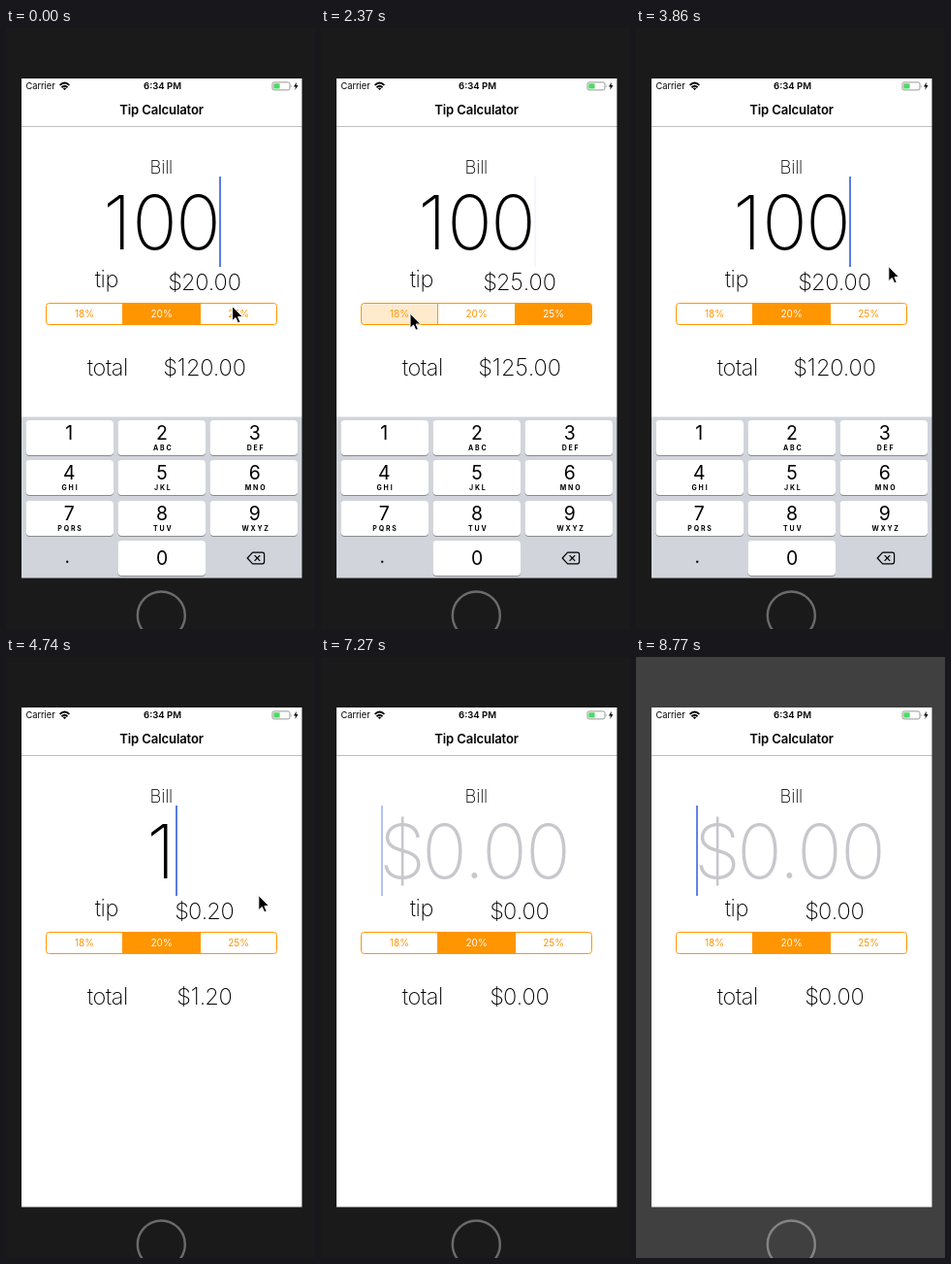
An HTML page for the animation above (8.87 s loop, 319 by 619 pixels).

```html
<!DOCTYPE html>
<html lang="en">
<head>
<meta charset="utf-8">
<title>Tip Calculator</title>
<style>
  html, body { margin: 0; width: 100%; height: 100%; overflow: hidden; background: #1a1a1a; }
  svg { display: block; width: 319px; height: 619px; }
  text { font-family: Inter, Roboto, "Liberation Sans", sans-serif; text-anchor: middle; white-space: pre; }
  .thin { font-weight: 200; }
  .semi { font-weight: 600; }
  .bold { font-weight: 700; }
</style>
</head>
<body>
<svg viewBox="0 0 319 619" xmlns="http://www.w3.org/2000/svg">
  <defs>
    <clipPath id="pill"><rect x="41.5" y="283.5" width="238" height="22" rx="3"/></clipPath>
  </defs>
  <rect x="15" y="51" width="292" height="517" fill="#fff"/>

  <!-- status bar -->
  <text x="35.6" y="63.4" font-size="9.3">Carrier</text>
  <g fill="none" stroke="#000" stroke-width="1.9">
    <path d="M55.6 58.9Q60.5 54.3 65.4 58.9"/>
    <path d="M57.5 61.2Q60.5 58.4 63.5 61.2"/>
  </g>
  <path d="M58.7 62.2Q60.5 60.9 62.3 62.2L60.5 64.1Z"/>
  <text x="161.6" y="63.4" font-size="9.6" class="semi">6:34 PM</text>
  <rect x="275" y="55.9" width="18" height="8" rx="1.8" fill="#fff" stroke="#8c8c8c" stroke-width=".9"/>
  <rect x="276.3" y="57.2" width="6.3" height="5.4" rx=".6" fill="#4cd964"/>
  <path d="M294.2 58.4q1.3 1.5 0 3z" fill="#8c8c8c"/>
  <path d="M300 55.8L297 60.4H299L298.3 64L301.6 59.1H299.5Z"/>

  <text x="160.6" y="89.2" font-size="13.1" letter-spacing="-.13" class="semi">Tip Calculator</text>
  <path d="M16 101.5H306" stroke="#bfbfc1"/>

  <!-- form -->
  <g class="thin">
    <text x="160.3" y="149.6" font-size="18.4" letter-spacing="-.2">Bill</text>
    <text x="103.8" y="267.4" font-size="23.5" letter-spacing="-.4">tip</text>
    <text x="104.8" y="358.2" font-size="23.5" letter-spacing="-.5">total</text>
    <text id="bill" y="227.8" font-size="77"></text>
    <text id="tip" y="270.2" font-size="23.6"></text>
    <text id="total" y="358.2" font-size="23.6"></text>
  </g>
  <rect id="caret" y="153" width="2" height="93" fill="#5a7be6"/>
  <g id="segments" clip-path="url(#pill)"></g>
  <path d="M120.5 284V305M200.5 284V305" stroke="#ff9500"/>
  <rect x="41.5" y="283.5" width="238" height="22" rx="3" fill="none" stroke="#ff9500"/>

  <g id="keyboard"></g>

  <!-- the phone body hides whatever slides off the screen -->
  <path id="bezel" fill-rule="evenodd" d="M0 0H319V619H0ZM16 52V566.5H305.5V52Z"/>
  <circle id="home" cx="160.3" cy="605" r="24.5" fill="none" stroke-width="2.4"/>
  <path id="mouse" d="M0 0V15.2L3.5 12L5.9 17.3L8.4 16.2L6.1 11H10.8Z" stroke="#fff"/>
</svg>
<script>
const LOOP = 8870;
const TICK = 148.3; // the screen updates in steps of this many ms
const NS = "http://www.w3.org/2000/svg";
const $ = id => document.getElementById(id);
const clamp = v => Math.min(1, Math.max(0, v));
const ease = v => { const p = clamp(v); return p * p * (3 - 2 * p); };

function add(parent, tag, attrs, text = "") {
  const el = document.createElementNS(NS, tag);
  for (const k in attrs) el.setAttribute(k, attrs[k]);
  el.textContent = text;
  parent.append(el);
  return el;
}

// All moments below are in ticks.
const MOVES = [
  { from: 0, to: 3, x: 251.5, y: 285 },
  { from: 11, to: 16, x: 92, y: 294 },
  { from: 18, to: 20, x: 131.5, y: 295 },
  { from: 21, to: 26, x: 260.8, y: 245.5 },
  { from: 38, to: 42, x: 302, y: 640 }
];
const TAPS = [
  { at: -9, seg: 1 }, { at: 6, seg: 2 }, { at: 16, seg: 0 }, { at: 19, seg: 1 }
];
const EDITS = [
  { at: -2.2, bill: "100" }, { at: 28, bill: "10" }, { at: 32, bill: "1" }, { at: 35, bill: "" }
];
const RATES = [.18, .2, .25];

const lastIndex = (list, n) => list.filter(e => e.at <= n).length - 1;

function mouseAt(n) {
  let x = 233.5, y = 286.5;
  for (const m of MOVES) {
    const p = ease((n - m.from) / (m.to - m.from));
    x += (m.x - x) * p;
    y += (m.y - y) * p;
  }
  return [x, y];
}

// Caret opacity, given the ms since the last edit
function blink(ms) {
  const phase = ms % 1000;
  const fadeIn = ms < 1000 ? 1 : clamp((phase - 30) / 100);
  return Math.min(fadeIn, 1 - clamp((phase - 550) / 160));
}

// How strongly each segment is filled while the selection cross-fades
function fills(n) {
  const i = lastIndex(TAPS, n), tap = TAPS[i];
  const p = clamp((n - tap.at) / 2) ** 2;
  const out = [0, 0, 0];
  if (i) out[TAPS[i - 1].seg] = 1 - p;
  out[tap.seg] = .2 + .8 * p;
  return out;
}

// Glyph advances of the large figures, in px
const ADVANCE = { "1": 32, "$": 42, ".": 17 };
const advance = ch => ADVANCE[ch] || 45;
const widthOf = s => [...s].reduce((w, ch) => w + advance(ch), 0);

function figures(el, str, mid, scale) {
  let x = mid - widthOf(str) * scale / 2;
  const xs = [...str].map(ch => {
    const w = advance(ch) * scale;
    x += w;
    return (x - w / 2).toFixed(2);
  });
  el.setAttribute("x", xs.join(" "));
  el.textContent = str;
}

const segments = RATES.map((rate, i) => ({
  box: add($("segments"), "rect", { x: 41 + i * 79.75, y: 283, width: 79.75, height: 23, fill: "#ff9500" }),
  text: add($("segments"), "text", { x: 81 + i * 79.6, y: 298.2, "font-size": 10 }, rate * 100 + "%")
}));

function buildKeyboard(g) {
  add(g, "rect", { x: 15, y: 400.5, width: 292, height: 168, fill: "#d1d5db" });
  const key = (col, row, digit, sub) => {
    const x = 20.5 + col * 95, y = 404 + Math.round(row * 41.4), mid = 65.2 + col * 95.8;
    const cap = { x, width: 90.5, height: 36, rx: 4 };
    add(g, "rect", { ...cap, y: y + 1, fill: "#898b8f" });
    add(g, "rect", { ...cap, y, fill: "#fff" });
    add(g, "text", { x: mid, y: y + (sub === null ? 25 : 19.8), "font-size": 19.4 }, digit);
    if (sub) add(g, "text", { x: mid + 1.3, y: y + 30.5, "font-size": 7, "letter-spacing": 1.8, class: "bold" }, sub);
  };
  const letters = ["", "ABC", "DEF", "GHI", "JKL", "MNO", "PQRS", "TUV", "WXYZ"];
  letters.forEach((sub, i) => key(i % 3, Math.floor(i / 3), i + 1, sub));
  key(1, 3, 0, null);
  add(g, "text", { x: 63.3, y: 551.2, "font-size": 19 }, ".");
  add(g, "path", {
    d: "M254.6 540.2H264.6Q266.6 540.2 266.6 542.2V549.8Q266.6 551.8 264.6 551.8H254.6L249.2 546ZM256.6 543.2L262.2 548.8M262.2 543.2L256.6 548.8",
    fill: "none", stroke: "#000", "stroke-width": 1.2, "stroke-linejoin": "round"
  });
}
buildKeyboard($("keyboard"));

const money = v => "$" + v.toFixed(2);

function draw(time) {
  const n = Math.floor((time + 20) / TICK);

  const lit = time >= 8770;
  $("bezel").setAttribute("fill", lit ? "#404040" : "#1a1a1a");
  $("home").setAttribute("stroke", lit ? "#848484" : "#6b6b6b");

  const { at, bill } = EDITS[lastIndex(EDITS, n)];
  const rate = RATES[TAPS[lastIndex(TAPS, n - 1)].seg];
  figures($("bill"), bill || "$0.00", 160, 1);
  $("bill").setAttribute("fill", bill ? "#000" : "#c7c7cd");
  figures($("tip"), money(bill * rate), 205.4, .313);
  figures($("total"), money(bill * (1 + rate)), 205.4, .313);

  $("caret").setAttribute("x", bill ? Math.floor(159.5 + widthOf(bill) / 2) : 62);
  $("caret").setAttribute("opacity", blink((n - at) * TICK));

  fills(n).forEach((f, i) => {
    segments[i].box.setAttribute("opacity", f);
    segments[i].text.setAttribute("fill", `rgb(255,${149 + 106 * f * f},${255 * f * f})`);
  });

  $("keyboard").setAttribute("transform", `translate(0 ${170 * ease((n - 27.5) / 3)})`);
  $("mouse").setAttribute("transform", `translate(${mouseAt(n).join(" ")})`);
}

const start = performance.now();
function frame() {
  draw((performance.now() - start) % LOOP);
  requestAnimationFrame(frame);
}
frame();
</script>
</body>
</html>
```
